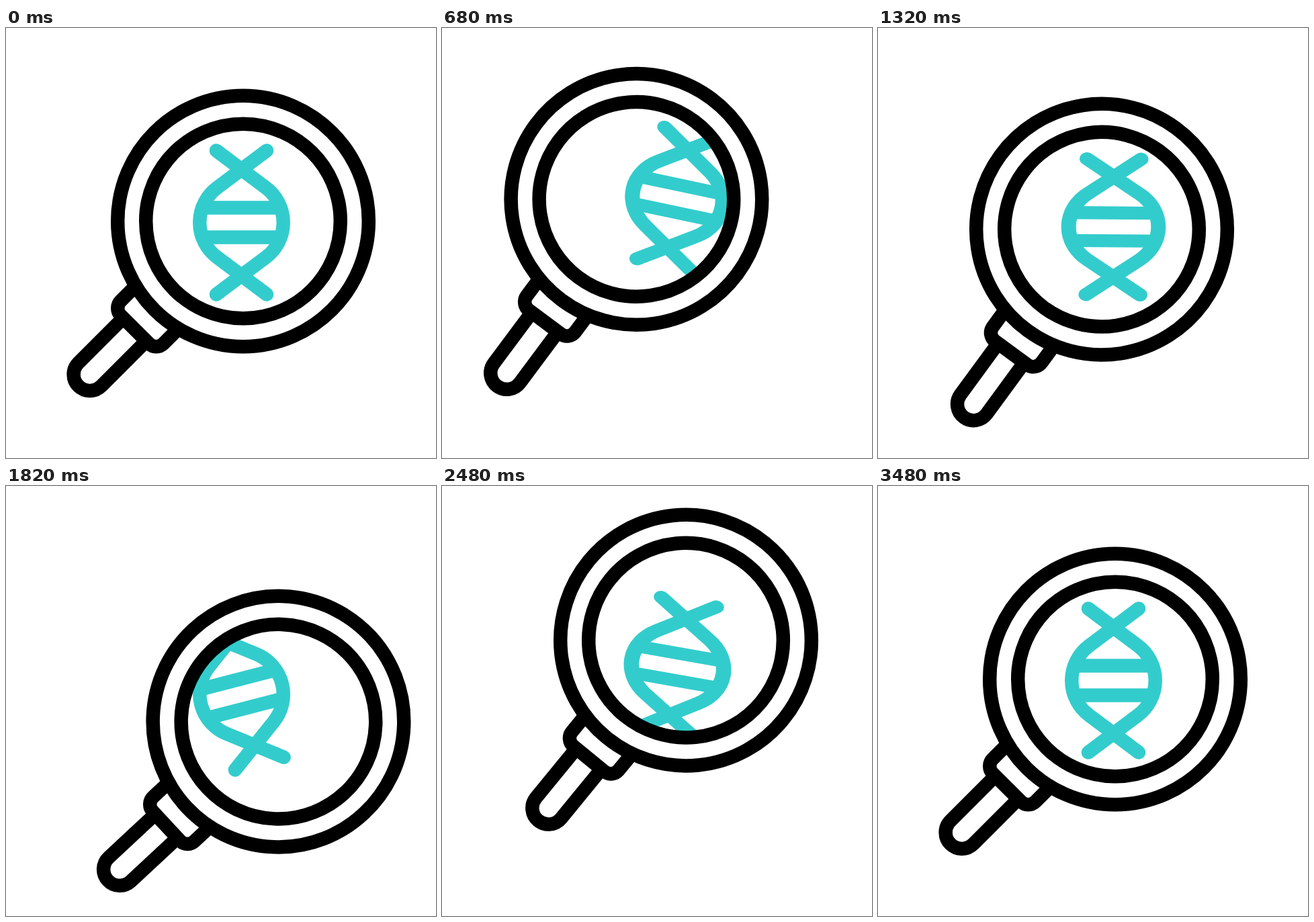
An HTML page without scripts that plays this animation: 640x640 px, repeating every 3.6 s.

```html
<!DOCTYPE html>
<html lang="en">
<head>
<meta charset="utf-8">
<title>DNA under a magnifying glass</title>
<style>
  html, body { margin: 0; width: 100%; height: 100%; overflow: hidden; background: #fff; }
  svg { display: block; width: 100%; height: 100%; }
  g { animation: 3600ms cubic-bezier(.37, 0, .63, 1) infinite; }
  .lens, .dna { fill: none; stroke-width: 20.5; }
  .lens { stroke: #000; }
  .dna { stroke: #3cc; stroke-linecap: round; }

  .sway { animation-name: sway; }
  .lens { animation-name: bob, tilt; }
  .dna { animation-name: hop, rock, squash; }

  @keyframes sway {
    0% { translate: 353px 0; animation-timing-function: cubic-bezier(.62, 0, .76, 1); }
    25.1% { translate: 263px 0; }
    48.6% { translate: 406px 0; }
    81.7% { translate: 342.5px 0; }
    92.2%, 100% { translate: 353px 0; }
  }
  @keyframes bob {
    0% { translate: 0 287.5px; animation-timing-function: cubic-bezier(.62, 0, .64, 1); }
    26.5% { translate: 0 243px; animation-timing-function: cubic-bezier(.33, 0, .8, 1); }
    45.8% { translate: 0 363px; }
    70% { translate: 0 229px; }
    95%, 100% { translate: 0 287.5px; }
  }
  @keyframes tilt {
    0% { rotate: 45deg; animation-timing-function: cubic-bezier(.62, 0, .64, 1); }
    29.4% { rotate: 31deg; }
    48.3% { rotate: 47.2deg; }
    73.3% { rotate: 38.7deg; animation-timing-function: cubic-bezier(.62, 0, .64, 1); }
    94.4%, 100% { rotate: 45deg; }
  }
  @keyframes hop {
    0% { translate: 350.5px 289.5px; }
    19.4% { translate: 350.5px 254px; }
    46.7% { translate: 350.5px 313.5px; }
    66.7% { translate: 350.5px 269px; }
    91.7%, 100% { translate: 350.5px 289.5px; }
  }
  @keyframes rock {
    0% { rotate: 0deg; }
    23.3% { rotate: 13deg; }
    51.7% { rotate: -14.6deg; }
    67.8% { rotate: 10deg; }
    94.4%, 100% { rotate: 0deg; }
  }
  @keyframes squash {
    0% { scale: 1 1; }
    27.8% { scale: 1.11 .917; }
    50.6% { scale: 1 1; }
    70.6% { scale: 1.11 .917; }
    95.6%, 100% { scale: 1 1; }
  }
</style>
</head>
<body>
<svg viewBox="0 0 640 640">
  <g class="dna">
    <path id="strand" d="M37.5-107L-36.3-51.8A64.7 64.7 0 0 0-36.3 51.8L37.5 107"/>
    <use href="#strand" transform="scale(-1 1)"/>
    <path d="M-52-22H52M-52 22H52" stroke-linecap="butt"/>
  </g>
  <g class="sway">
    <g class="lens">
      <!-- white surround hides the helix outside the glass -->
      <circle r="345" stroke="#fff" stroke-width="400"/>
      <path d="M-24.2 228V322.7A24.2 24.2 0 0 0 24.2 322.7V228"/>
      <path d="M-45 181V212.8A15.2 15.2 0 0 0-29.8 228H29.8A15.2 15.2 0 0 0 45 212.8V181"/>
      <circle r="186.8"/>
      <circle r="144.8"/>
    </g>
  </g>
</svg>
</body>
</html>
```
